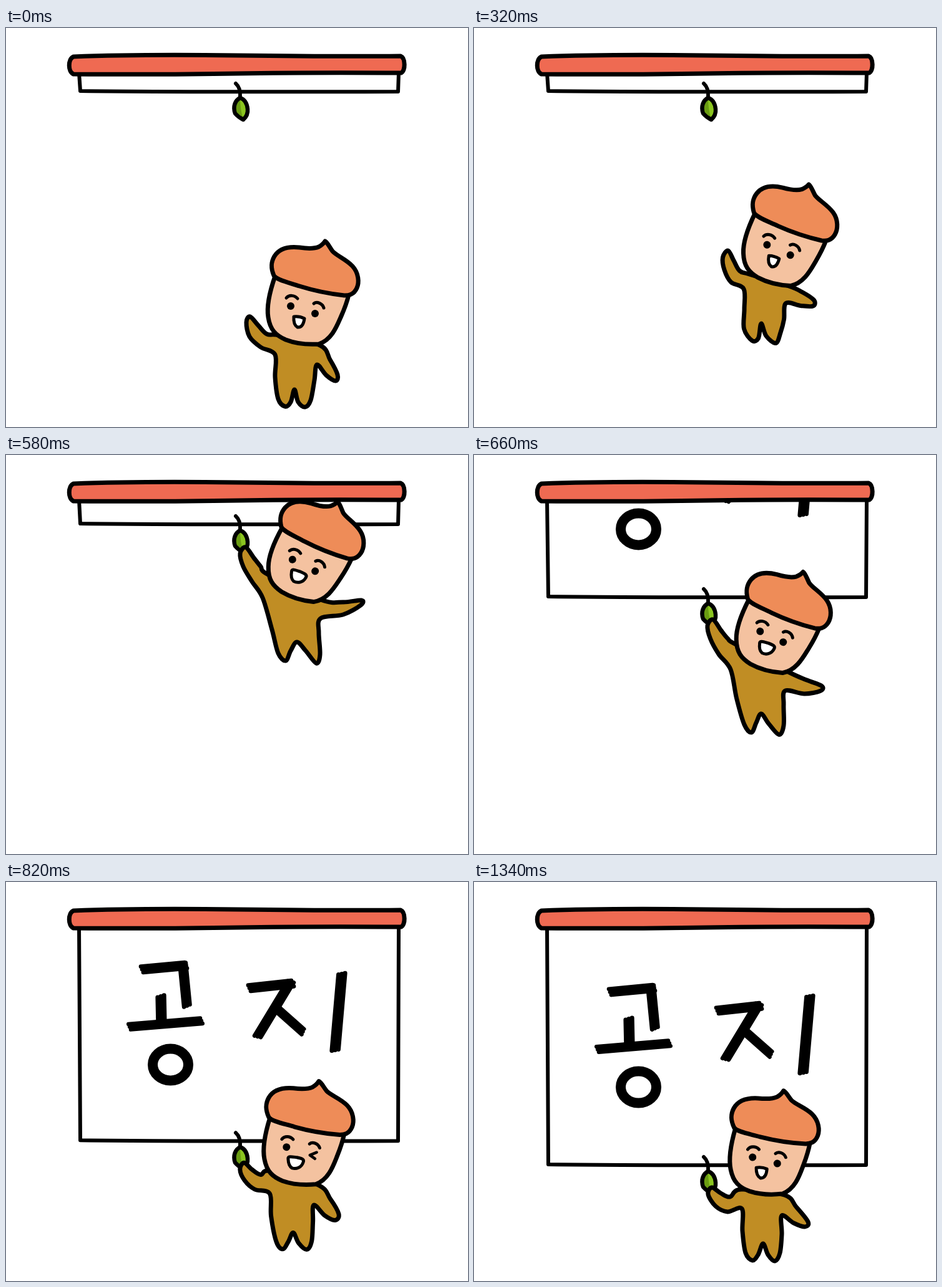
Animation of 740x640 px, one loop 1.79 s. Source, as an HTML page with a canvas:

```html
<!DOCTYPE html>
<html lang="ko">
<head>
<meta charset="utf-8">
<style>
  html, body { margin: 0; width: 740px; height: 640px; overflow: hidden; background: #fff; }
  canvas { display: block; }
</style>
</head>
<body>
<canvas id="stage" width="740" height="640" role="img" aria-label="공지"></canvas>
<script>
const ctx = document.getElementById('stage').getContext('2d');
const LOOP = 1790, REST = 102, FULL = 462, HEAD_X = 475.5, HEAD_Y = 452;

// Pose: sheet bottom, head x, head y, head tilt, then the body outline
// from the left shoulder round the hand, feet and right hand.
const wave = [102, 475.5, 452, 0,
  438,493, 418,491, 404,477, 391,463, 385,472, 390,495, 408,512, 431,524,
  431,560, 436,595, 447,607, 456,600, 462,580, 468,600, 479,608, 488,597,
  494,565, 498,540, 513,557, 528,566, 531,556, 519,532, 503,509];
const crouch = [102, 494.5, 461.5, -1,
  452,504, 430,511, 418,501, 408,491, 400,503, 407,524, 419,536, 443,534,
  444,556, 433,580, 445,604, 456,607, 461,578, 458,600, 470,611, 482,592,
  502,580, 510,547, 527,562, 543,574, 546,565, 532,538, 517,518];
const leap = [102, 481.5, 250.5, 14.5,
  430,286, 421,268, 414,245, 406,223, 397,233, 395,252, 404,279, 421,303,
  422,345, 432,385, 446,399, 455,388, 459,370, 478,388, 497,400, 500,385,
  491,355, 489,336, 520,329, 543,318, 543,308, 519,309, 489,309];
const grab = [111, 477, 177, 10,
  420,192, 408,179, 397,165, 384,148, 375,158, 380,179, 394,203, 411,229,
  426,280, 436,318, 448,330, 456,314, 466,300, 480,314, 497,334, 503,320,
  501,285, 504,262, 540,256, 568,241, 569,233, 540,236, 504,232];
const pull = [345, 476.5, 406, 6,
  419,416, 405,410, 394,397, 382,380, 373,389, 377,410, 390,436, 411,459,
  415,500, 430,547, 441,560, 448,545, 454,530, 464,548, 480,563, 489,548,
  491,515, 493,494, 518,510, 541,516, 545,508, 526,486, 501,463];
const winking = [462, 464, 447, -7,
  428,495, 410,509, 394,504, 381,497, 376,509, 386,525, 404,531, 430,527,
  431,560, 435,597, 445,608, 455,598, 464,584, 472,600, 483,607, 490,595,
  492,565, 493,534, 506,552, 518,560, 525,549, 515,523, 499,501];
const done = [454, 466, 446.5, -3,
  428,493, 410,505, 395,499, 381,490, 375,501, 387,520, 406,529, 429,524,
  430,560, 435,595, 446,607, 455,598, 463,580, 471,598, 482,608, 490,595,
  493,565, 493,535, 512,547, 530,553, 535,545, 516,521, 497,502];

// Held steps: start time, from pose, to pose, amount
const steps = [
  [0, wave, wave, 0], [90, wave, crouch, .5], [210, crouch, crouch, 0],
  [320, crouch, leap, .5], [400, leap, leap, 0], [480, leap, grab, .8],
  [580, grab, grab, 0], [660, grab, pull, .5], [730, pull, pull, 0],
  [820, pull, winking, .6], [940, pull, winking, .95], [1060, winking, winking, 0],
  [1190, winking, done, .5], [1340, done, done, 0]
];

const shapes = {
  roller: 'M108 46Q210 42 370 44T632 45C640 48 640 69 633 72Q480 71 370 73T108 74C99 70 99 50 108 46Z',
  stem: 'M368 89Q376 96 375 111',
  leaf: 'M375 112C367 116 363 126 367 137Q372 143 380 147Q388 140 387 130C386 120 381 114 375 112Z',
  leafShade: 'M375 112C367 116 363 126 367 137Q372 143 380 147Q375 130 375 112Z',
  face: 'M431 398C423 421 417 446 420 464C423 484 432 493 448 500C466 507 485 508 501 507C522 500 530 478 537 462Q545 444 549 428Z',
  hat: 'M429 397C424 385 424 376 430 366C438 353 452 350 470 352C483 354 494 354 501 351Q508 347 511 342C515 344 518 351 523 358C529 365 545 371 555 382C565 393 566 408 562 417C557 428 549 429 542 429C515 426 489 420 470 414C452 408 433 404 429 397Z',
  brows: 'M449 433C453 428 462 428 467 434M493 442C498 438 507 442 509 449',
  smile: 'M461 463Q470 462 478 466Q476 481 467 480Q460 476 461 463Z',
  grin: 'M458 465C457 460 465 462 472 463C480 465 484 466 482 471C479 480 470 482 464 480C459 477 458 471 458 465Z',
  wink: 'M504 456L493 460L501 466',
  speed: 'M461 421L467 435M483.5 417L485 431'
};
for (const name in shapes) shapes[name] = new Path2D(shapes[name]);

function paint(path, fill, width = 7) {
  if (fill) { ctx.fillStyle = fill; ctx.fill(path); }
  if (width) { ctx.lineWidth = width; ctx.stroke(path); }
}

function dot(x, y, r) {
  ctx.beginPath();
  ctx.arc(x, y, r, 0, 7);
  ctx.fillStyle = '#000';
  ctx.fill();
}

// Closed Catmull-Rom curve through flat x, y pairs
function smooth(p) {
  const path = new Path2D(), n = p.length / 2;
  const at = i => { const j = (i + n) % n * 2; return [p[j], p[j + 1]]; };
  path.moveTo(p[0], p[1]);
  for (let i = 0; i < n; i++) {
    const [a, b, c, d] = [at(i - 1), at(i), at(i + 1), at(i + 2)];
    path.bezierCurveTo(b[0] + (c[0] - a[0]) / 6, b[1] + (c[1] - a[1]) / 6,
      c[0] - (d[0] - b[0]) / 6, c[1] - (d[1] - b[1]) / 6, c[0], c[1]);
  }
  path.closePath();
  return path;
}

// Brush stroke made of three bristles with uneven ends
function brush(x1, y1, x2, y2, width = 16) {
  const len = Math.hypot(x2 - x1, y2 - y1), ux = (x2 - x1) / len, uy = (y2 - y1) / len;
  ctx.lineWidth = width * .42;
  ctx.beginPath();
  for (const k of [-1, 0, 1]) {
    const off = k * width * .3, cut = 2 + k * 1.5;
    ctx.moveTo(x1 - uy * off + ux * cut, y1 + ux * off + uy * cut);
    ctx.lineTo(x2 - uy * off - ux * (4 - cut), y2 + ux * off - uy * (4 - cut));
  }
  ctx.stroke();
}

function drawLettering() {
  brush(216, 184, 290, 177);
  brush(283, 173, 290, 244);
  brush(248, 225, 249, 272, 17);
  brush(196, 276, 315, 266, 15);
  ctx.lineWidth = 16;
  ctx.beginPath();
  ctx.ellipse(263.5, 336.5, 28.5, 25.5, 0, 0, 7);
  ctx.stroke();
  brush(388, 214, 461, 206);
  brush(457, 202, 402, 293);
  brush(434, 247, 477, 285, 15);
  brush(538, 189, 527, 315, 17);
}

function drawBanner(bottom) {
  paint(new Path2D(`M117 72L119 ${bottom - 1}Q300 ${bottom + 1} 628 ${bottom}L629 72`), '#fff', 6);
  ctx.save();
  ctx.beginPath();
  ctx.rect(0, 74, 740, 566);
  ctx.clip();
  ctx.translate(0, (bottom - FULL) * .93);
  drawLettering();
  ctx.restore();
  paint(shapes.roller, '#ef6a52');
  ctx.save();
  ctx.translate(0, bottom - REST);
  paint(shapes.stem, null, 6);
  paint(shapes.leaf, '#8bc520', 0);
  paint(shapes.leafShade, '#6a9c12', 0);
  paint(shapes.leaf, null, 6.5);
  ctx.restore();
}

function drawHead(x, y, tilt, winks, grins) {
  ctx.save();
  ctx.translate(x, y);
  ctx.rotate(tilt * Math.PI / 180);
  ctx.translate(-HEAD_X, -HEAD_Y);
  paint(shapes.face, '#f4c2a0');
  paint(shapes.hat, '#ee8c58');
  paint(shapes.brows, null, 5);
  dot(456, 446, 6);
  if (winks) paint(shapes.wink, null, 4.5);
  else dot(495, 458, 6);
  paint(grins ? shapes.grin : shapes.smile, '#fff', 5);
  ctx.restore();
}

function frame(now) {
  const t = now % LOOP;
  const [, from, to, k] = steps.findLast(s => s[0] <= t);
  const [bottom, x, y, tilt, ...body] = from.map((v, i) => v + (to[i] - v) * k);
  const mood = k > .5 ? to : from;
  ctx.fillStyle = '#fff';
  ctx.fillRect(0, 0, 740, 640);
  ctx.strokeStyle = '#000';
  ctx.lineCap = ctx.lineJoin = 'round';
  drawBanner(bottom);
  paint(smooth(body), '#c08d24');
  drawHead(x, y, tilt, mood === winking, [leap, grab, pull, winking].includes(mood));
  if (from === leap && to === leap) paint(shapes.speed, null, 6);
}

const start = performance.now();
function tick() {
  frame(performance.now() - start);
  requestAnimationFrame(tick);
}
tick();
</script>
</body>
</html>
```
